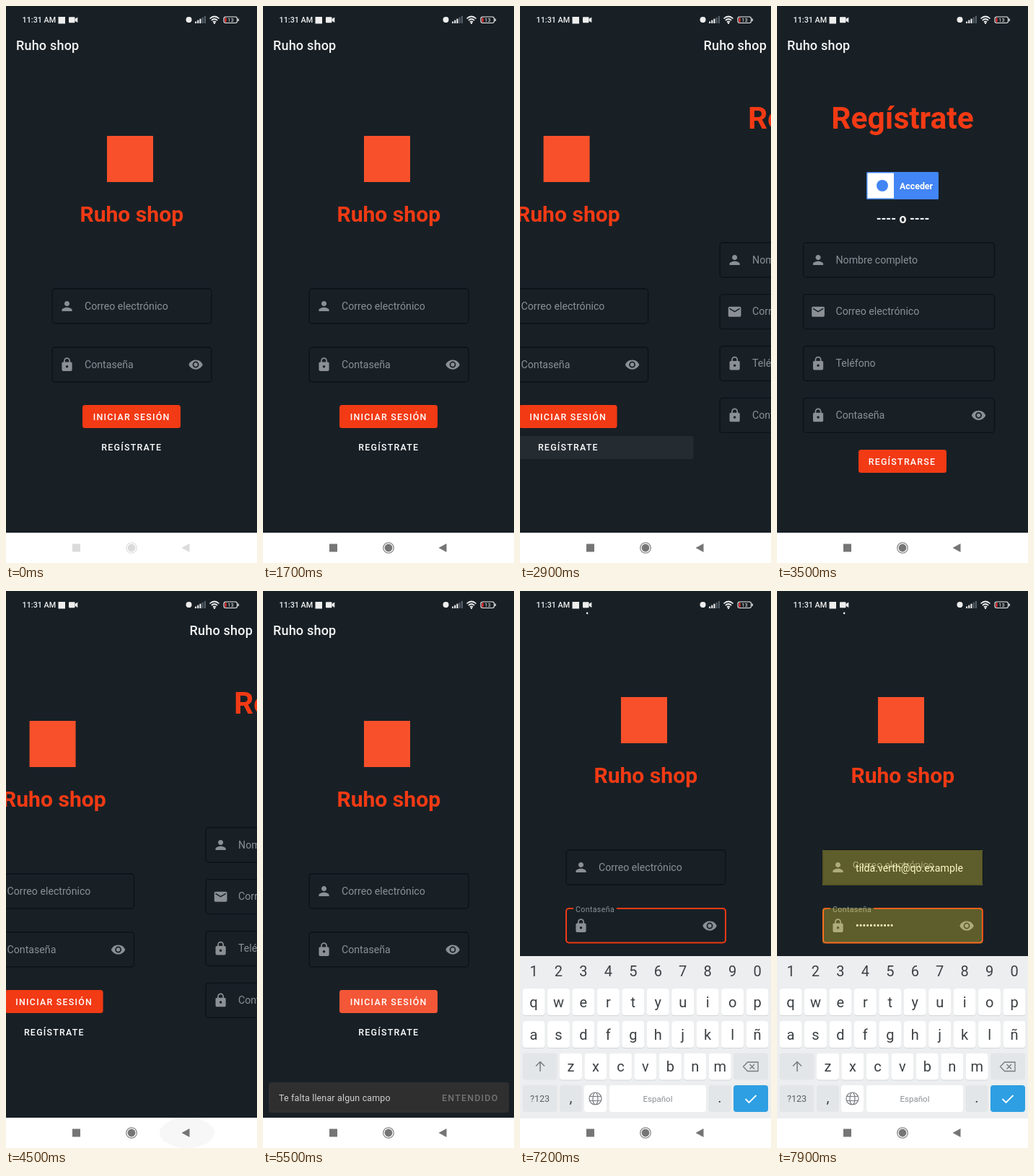
Write an HTML page that moves like this. It is 348 px wide and 772 px high and loops after 8000 ms.

```html
<!DOCTYPE html>
<html lang="es">
<head>
<meta charset="utf-8">
<title>Ruho shop</title>
<style>
  html, body { margin: 0; height: 100%; overflow: hidden; background: #182026; }
  svg { display: block; width: 100vw; height: 100vh; }
  text { font-family: Roboto, "Noto Sans", sans-serif; white-space: pre; }
  .mid { text-anchor: middle; }
  .bold { font-weight: 700; }
  .caps { font-weight: 500; font-size: 12.4px; letter-spacing: 1.25px; fill: #fff; }
  .hint, .icon { fill: #8b9095; }
  .bar { font-size: 18px; font-weight: 500; letter-spacing: .2px; fill: #f4f4f4; }
  .box { fill: none; stroke: #0b1217; stroke-width: 1.3; }
  .key { font-size: 20px; fill: #3c4043; text-anchor: middle; }
</style>
</head>
<body>
<svg id="stage" viewBox="0 0 348 772"></svg>
<script>
const BG = '#182026', RED = '#f23a14', LOOP = 8000;
const PATHS = {
  person: 'M12 12c2.21 0 4-1.79 4-4s-1.79-4-4-4-4 1.79-4 4 1.79 4 4 4zm0 2c-2.67 0-8 1.34-8 4v2h16v-2c0-2.66-5.33-4-8-4z',
  lock: 'M18 8h-1V6c0-2.76-2.24-5-5-5S7 3.24 7 6v2H6c-1.1 0-2 .9-2 2v10c0 1.1.9 2 2 2h12c1.1 0 2-.9 2-2V10c0-1.1-.9-2-2-2zm-6 9a2 2 0 1 1 0-4 2 2 0 0 1 0 4zm3.1-9H8.9V6a3.1 3.1 0 0 1 6.2 0z',
  mail: 'M20 4H4a2 2 0 0 0-2 2v12c0 1.1.9 2 2 2h16a2 2 0 0 0 2-2V6a2 2 0 0 0-2-2zm0 4l-8 5-8-5V6l8 5 8-5z',
  eye: 'M12 4.5C7 4.5 2.73 7.61 1 12c1.73 4.39 6 7.5 11 7.5s9.27-3.11 11-7.5c-1.73-4.39-6-7.5-11-7.5zM12 17a5 5 0 1 1 0-10 5 5 0 0 1 0 10zm0-8a3 3 0 1 0 0 6 3 3 0 0 0 0-6z'
};

const rect = (x, y, w, h, fill, r = 0, more = '') =>
  `<rect x="${x}" y="${y}" width="${w}" height="${h}" rx="${r}" fill="${fill}" ${more}/>`;
const text = (x, y, str, cls, more = '') => `<text x="${x}" y="${y}" class="${cls}" ${more}>${str}</text>`;
const icon = (name, x, y) =>
  `<path class="icon" d="${PATHS[name]}" transform="translate(${x - 10.6} ${y - 10.6}) scale(.886)"/>`;
const stroke = (d, color, w) => `<path d="${d}" fill="none" stroke="${color}" stroke-width="${w}"/>`;
const toolbar = () => text(14, 61, 'Ruho shop', 'bar');

function field(x, y, w, name, label, id = '', eye = false) {
  return `<rect class="box" x="${x}" y="${y}" width="${w}" height="48" rx="4"/>` +
    icon(name, x + 20.5, y + 24) + (eye ? icon('eye', x + w - 22, y + 24) : '') +
    text(x + 45, y + 28.5, label, 'hint', `font-size="14.17" id="${id}"`);
}

function login() {
  return toolbar() +
    rect(140, 180, 64, 64, '#f8502a') +
    text(174.3, 298.5, 'Ruho shop', 'mid bold', `font-size="30.1" fill="${RED}"`) +
    field(64, 392, 221, 'person', 'Correo electrónico', 'mailHint') +
    field(64, 473, 221, 'lock', '', '', true) +
    `<g id="focus">${rect(64, 473, 221, 47.5, 'none', 4, `stroke="${RED}" stroke-width="2"`)}${rect(74, 471, 60, 4, BG)}</g>` +
    text(109, 501.5, 'Contaseña', 'hint', 'id="passHint"') +
    `<g id="filled">` +
      text(109, 422, 'tilda.verth@qo.example', '', 'font-size="14.17" fill="#fff"') +
      text(109, 502, '•'.repeat(11), '', 'font-size="14.17" fill="#fff"') +
      rect(63, 392, 222, 49, '#ffeb3b', 0, 'opacity=".3"') +
      rect(63, 472.5, 222, 49, '#ffeb3b', 2, 'opacity=".3"') +
    `</g>` +
    rect(106, 553, 136, 32, RED, 3.5) +
    rect(106, 553, 136, 32, '#fff', 3.5, 'id="press"') +
    text(120.7, 574, 'INICIAR SESIÓN', 'caps') +
    rect(0, 596, 348, 32, '#fff', 3.5, 'id="ripple"') +
    text(132.3, 616.3, 'REGÍSTRATE', 'caps');
}

function register() {
  return toolbar() +
    text(174, 170, 'Regístrate', 'mid bold', `font-size="42.5" fill="${RED}"`) +
    rect(124, 230, 100, 38, '#4285f4', 1.5) + rect(125.5, 231.5, 36.5, 35, '#fff') +
    '<circle cx="146" cy="249" r="8" fill="#4285f4"/>' +
    text(193, 254, 'Acceder', 'mid bold', 'font-size="12.4" fill="#fff"') +
    text(174.5, 300.5, '---- o ----', 'mid bold', 'font-size="17.7" fill="#f4f4f4"') +
    field(36.5, 328, 265, 'person', 'Nombre completo') +
    field(36.5, 399.7, 265, 'mail', 'Correo electrónico') +
    field(36.5, 471.5, 265, 'lock', 'Teléfono') +
    field(36.5, 543.3, 265, 'lock', 'Contaseña', '', true) +
    rect(113, 615, 122, 32, RED, 3.5) +
    text(126.7, 635.7, 'REGÍSTRARSE', 'caps');
}

function keyboard() {
  const row = (keys, x, y, caps = true) => [...keys].map((k, i) => {
    const cx = x + i * 34.45;
    return (caps ? rect(cx - 15.5, y - 18.5, 31, 38, '#d3d6d9', 4) + rect(cx - 15.5, y - 18.5, 31, 37, '#fff', 4) : '') +
      text(cx, y + 7, k, 'key');
  }).join('');
  const grey = (x, y, w) => rect(x, y, w, 37, '#e3e6e8', 4);
  const line = (d, w = 1.5, c = '#777b7f') => stroke(d, c, w);
  return rect(0, 506, 348, 266, '#eceeef') + rect(0, 731, 348, 41, '#fff') +
    row('1234567890', 19, 527, false) + row('qwertyuiop', 19, 569.5) +
    row('asdfghjklñ', 19, 614.5) + row('zxcvbnm', 70.5, 659) +
    grey(3.5, 640.5, 48) + line('M28 666V653M22 658.5l6-6 6 6') +
    grey(296, 640.5, 48) + line('M315.500 653H330v12.500H315.500l-6-6.250zM318.500 656l6.500 6.500m0-6.500l-6.500 6.500', 1.3) +
    grey(3.5, 685, 48) + text(27.5, 708, '?123', 'mid', 'font-size="12.5" fill="#5a5e62"') +
    grey(55, 685, 31) + text(70.5, 709, ',', 'key') +
    rect(89, 685, 31, 37, '#fff', 4) +
    line('M96 703.500a8.500 8.500 0 1 0 17 0a8.500 8.500 0 1 0-17 0M101 703.500a3.500 8.500 0 1 0 7 0a3.500 8.500 0 1 0-7 0M97 700.500h15M97 706.500h15', 1.2) +
    rect(124, 685, 134, 37, '#fff', 4) + text(191, 708, 'Español', 'mid', 'font-size="11.5" fill="#8b8f93"') +
    grey(261.5, 685, 31) + text(277, 709, '.', 'key') +
    rect(296, 685, 48, 37, '#2d9fe2', 4) + line('M312.500 704l5 5 10-10', 1.8, '#fff');
}

function statusBar() {
  const bars = [0, 1, 2, 3, 4].map(i =>
    rect(262 + i * 3.2, 21.5 - i * 1.9, 2.1, 2.5 + i * 1.9, i < 3 ? '#eee' : '#59616a')).join('');
  return rect(0, 0, 348, 29.5, BG) +
    text(22.5, 23, '11:31 AM', '', 'font-size="10.8" font-weight="500" fill="#eee"') +
    rect(72.5, 15, 9.5, 9.5, '#eee') +
    rect(87, 15.2, 8.5, 8, '#eee', 1) + '<path d="M95.500 18l3.800-2.500v7.500l-3.800-2.500z" fill="#eee"/>' +
    '<circle cx="253.500" cy="19" r="4" fill="#eee"/>' + bars +
    stroke('M282.500 17.500q6.500-6 13 0M284.800 20q4.200-4 8.400 0M287 22.300q2-2 4 0', '#eee', 1.7) +
    '<circle cx="289" cy="23.800" r="1.200" fill="#eee"/>' +
    rect(302, 15, 18.5, 8.5, 'none', 2.5, 'stroke="#eee" stroke-width="1.1"') +
    rect(303.5, 16.3, 2, 6, '#f33') + rect(321.5, 17.5, 1.4, 3.5, '#eee') +
    text(311.5, 22, '13', 'mid', 'font-size="7.500" fill="#eee"');
}

const nav =
  rect(92, 745.5, 11, 11, '#757575') +
  '<circle cx="174" cy="751" r="7.300" fill="none" stroke="#757575" stroke-width="1.100"/>' +
  '<circle cx="174" cy="751" r="5.400" fill="#757575"/>' +
  '<path d="M243.500 751L254.500 745v12z" fill="#757575"/>';

document.getElementById('stage').innerHTML =
  rect(0, 0, 348, 772, BG) +
  `<g id="page">
    <g id="login">${login()}</g>
    <g id="register">${register()}</g>
    ${rect(0, 730, 348, 42, '#fff')}
    <ellipse id="back" cx="251" cy="751" rx="38" ry="21" fill="#f7f7f7"/>
    <g id="snack">${rect(8, 681, 333, 42, '#302f2f', 4)}
      ${text(22, 707, 'Te falta llenar algun campo', '', 'font-size="12.4" letter-spacing=".2" fill="#d0d0d0"')}
      ${text(248, 707, 'ENTENDIDO', 'caps', 'style="fill:#747474"')}</g>
  </g>
  <g id="keys">${keyboard()}</g>
  <g id="nav">${nav}</g>` + statusBar();

const $ = id => document.getElementById(id);
const set = (id, attrs) => { for (const k in attrs) $(id).setAttribute(k, attrs[k]); };
const part = (t, a, b) => Math.min(1, Math.max(0, (t - a) / (b - a)));
const smooth = x => .5 - .5 * Math.cos(Math.PI * x);
const slow = x => 1 - (1 - x) ** 2;
const pulse = (t, a, b, c, d) => part(t, a, b) - part(t, c, d);

// Moves a field hint from inside the box up onto its top edge.
function floatHint(id, rest, k) {
  set(id, {
    x: 109 - 32 * k, y: rest - 24 * k,
    'font-size': 14.17 - 3.54 * k, 'letter-spacing': .35 * k
  });
}

function draw(t) {
  const slide = 348 * (smooth(part(t, 2750, 3150)) - smooth(part(t, 4250, 4650)));
  set('login', { transform: `translate(${-slide} 0)` });
  set('register', { transform: `translate(${348 - slide} 0)` });
  set('page', { transform: `translate(0 ${-33 * slow(part(t, 6850, 7130))})` });

  set('nav', { opacity: .25 + .75 * part(t, 400, 1000) });
  set('ripple', { opacity: .1 * pulse(t, 2350, 2550, 2750, 3050) });
  set('back', { opacity: pulse(t, 4050, 4200, 4500, 4700) });
  set('press', { opacity: .15 * pulse(t, 4850, 5050, 5500, 5700) });

  const pop = part(t, 5250, 5480), size = .8 + .2 * slow(pop);
  set('snack', {
    opacity: pop,
    transform: `translate(174.5 702) scale(${size}) translate(-174.5 -702)`
  });

  set('focus', { opacity: t >= 6400 ? 1 : 0 });
  floatHint('passHint', 501.5, smooth(part(t, 6400, 6570)));
  const rise = slow(part(t, 6870, 7170));
  set('keys', { opacity: rise, transform: `translate(0 ${266 * (1 - rise)})` });

  set('filled', { opacity: t >= 7850 ? 1 : 0 });
  floatHint('mailHint', 420.5, part(t, 7878, 8045));
}

function tick(now) {
  draw(Math.floor(now % LOOP / 100) * 100);
  requestAnimationFrame(tick);
}
draw(0);
requestAnimationFrame(tick);
</script>
</body>
</html>
```
